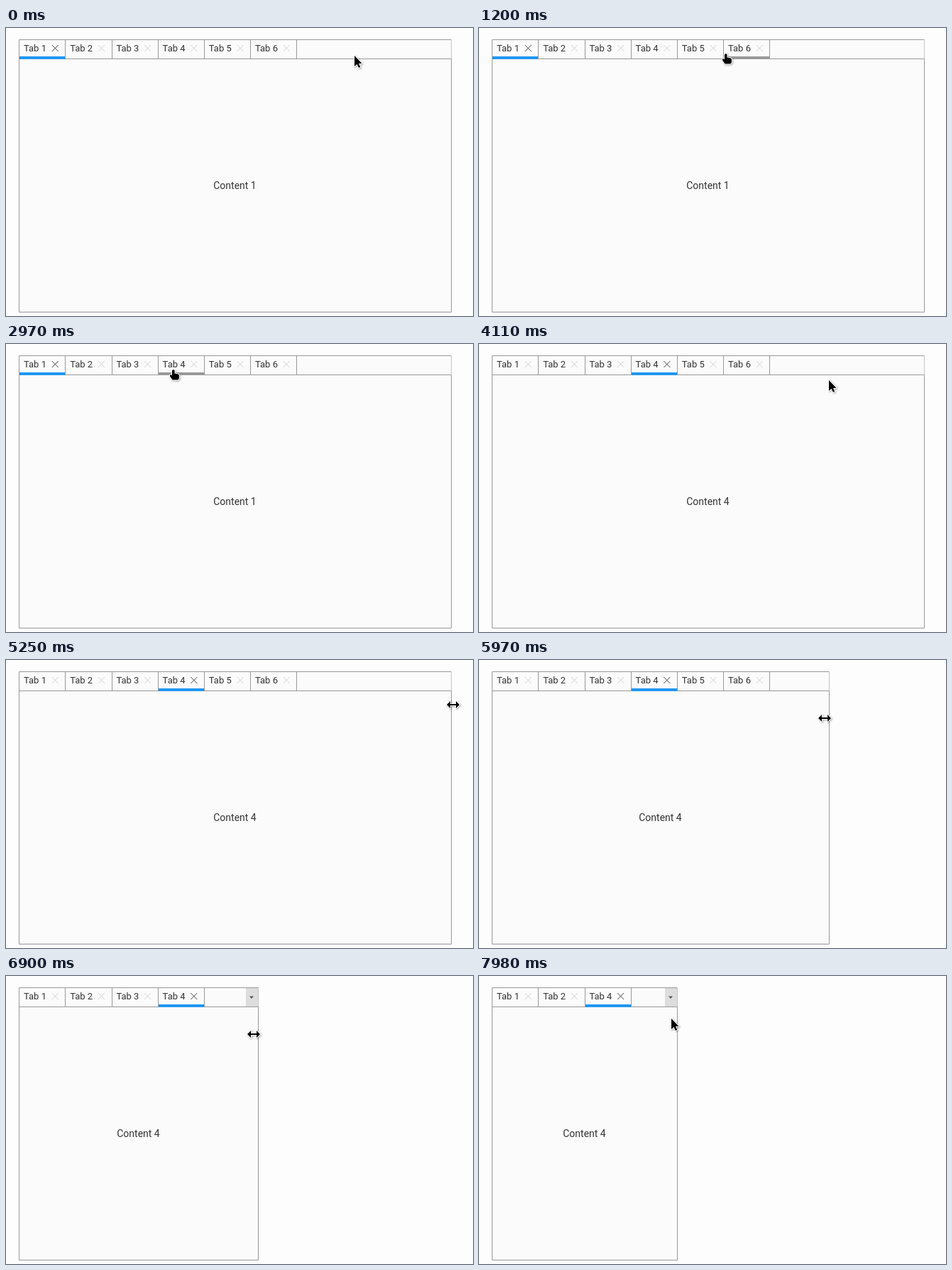
Recreate the animation shown at these times as an HTML page. Size 658x406 px, loop 8000 ms.

```html
<!DOCTYPE html>
<html lang="en">
<head>
<meta charset="utf-8">
<title>Resizable tabs</title>
<style>
  html, body { margin: 0; width: 100%; height: 100%; overflow: hidden; background: #fdfdfd; }
  svg { display: block; font: 13px Roboto, sans-serif; fill: #333; }
  rect { shape-rendering: crispEdges; }
  .close { stroke: #d2d2d2; fill: none; }
  .active .close { stroke: #444; }
  .divider { fill: #999; }
  .bar { fill: none; }
  .hover .bar { fill: #999; }
  .active .bar { fill: #2196f3; }
  #cursor {
    fill: #000; stroke: #fff; stroke-width: 2; paint-order: stroke; stroke-linejoin: round;
    filter: drop-shadow(1px 1px 1px #0005);
  }
</style>
</head>
<body>
<svg width="658" height="406" viewBox="0 0 658 406">
  <rect id="panel" x="18" y="16" height="384" fill="#fbfbfb"/>
  <path id="frame" fill="none" stroke="#999"/>
  <path id="barEnd" fill="none" stroke="#c4c4c4"/>
  <g id="tabs"></g>
  <g id="more">
    <rect x="-17" y="17" width="17" height="26" fill="#ddd"/>
    <path d="M-12 28.5h6l-3 3.5z" fill="#555"/>
  </g>
  <text id="content" y="227" font-size="14" text-anchor="middle"></text>
  <path id="cursor"/>
</svg>
<script>
const LOOP = 8000, STEP = 30, TAB_COUNT = 6, LEFT = 18.25, TAB_WIDTH = 65.2, MORE_WIDTH = 17;
const $ = id => document.getElementById(id);

const SHAPES = {
  arrow: 'M1 1V16L4.5 13 7 18 9.2 17 7 12H11.5Z',
  hand: 'M-2 1.5Q-.2-.8 1.5 1.5V5.5L6 6.3Q8 6.8 8 9V12L6.5 14.5H-1.5L-5 9.5Q-5.5 7-3.5 7.3L-2 8.5Z',
  resize: 'M-9 0L-4-5V-1H4V-5L9 0 4 5V1H-4V5Z'
};

$('tabs').innerHTML = Array.from({ length: TAB_COUNT }, (_, i) => `<g>
  <rect class="divider" x="${TAB_WIDTH}" y="17" width="1" height="26"/>
  <rect class="bar" x="1" y="40" width="${TAB_WIDTH - 1}" height="4"/>
  <text x="6.75" y="33">Tab ${i + 1}</text>
  <path class="close" d="M46.5 24l9 9m0-9l-9 9"/></g>`).join('');
const tabs = [...$('tabs').children];

function draw(time) {
  const t = Math.floor(time % LOOP / STEP) * STEP;

  // Progress from 0 to 1; a positive bend slows the end
  const ease = (from, to, bend = 0) => {
    const u = Math.min(1, Math.max(0, (t - from) / (to - from)));
    return u + bend * u * (1 - u);
  };

  // Glide to tab 3, back to tab 4, over to the edge, drag it, let go
  const x = Math.round(490 - 294 * ease(390, 2430, .36) + 40 * ease(2550, 2970)
    + 394 * ease(3570, 4890, 1) - 350 * ease(5250, 7620, .5) - 10 * ease(7860, 7980));
  const y = Math.round(38 - 2 * ease(390, 1200) + 27 * ease(3570, 4890, .5)
    + 19 * ease(5250, 5970) - 23 * ease(7860, 7980));
  const edge = Math.floor(627 - 348 * ease(5250, 7590, .36));
  const active = t < 3390 ? 0 : 3;

  const overflow = edge < Math.floor(LEFT + TAB_WIDTH * TAB_COUNT);
  const room = overflow ? Math.floor((edge - LEFT - MORE_WIDTH) / TAB_WIDTH) : TAB_COUNT;
  const shown = [...tabs.keys()].slice(0, room);
  if (!shown.includes(active)) shown[room - 1] = active;

  const inBar = y > 16 && y < 44;
  const hovered = inBar ? shown[Math.floor((x - LEFT) / TAB_WIDTH)] : undefined;
  tabs.forEach((tab, i) => {
    const slot = shown.indexOf(i);
    tab.style.display = slot < 0 ? 'none' : '';
    tab.setAttribute('transform', `translate(${LEFT + slot * TAB_WIDTH} 0)`);
    tab.setAttribute('class', i === active ? 'active' : i === hovered ? 'hover' : '');
  });

  $('panel').setAttribute('width', edge - 18);
  $('frame').setAttribute('d', `M${edge + .5} 16.5H18.5V400.5H${edge + .5}V43.5H18.5`);
  $('barEnd').setAttribute('d', `M${edge + .5} 17V43`);
  $('more').style.display = overflow ? '' : 'none';
  $('more').setAttribute('transform', `translate(${edge} 0)`);
  $('content').setAttribute('x', (18 + edge) / 2);
  $('content').textContent = `Content ${active + 1}`;

  const dragging = t >= 5250 && t <= 7620;
  const shape = dragging || Math.abs(x - edge) < 8 ? 'resize' : hovered !== undefined ? 'hand' : 'arrow';
  $('cursor').setAttribute('d', SHAPES[shape]);
  $('cursor').setAttribute('transform', `translate(${x} ${y})`);
}

const start = performance.now();
(function tick() {
  draw(performance.now() - start);
  requestAnimationFrame(tick);
})();
</script>
</body>
</html>
```
